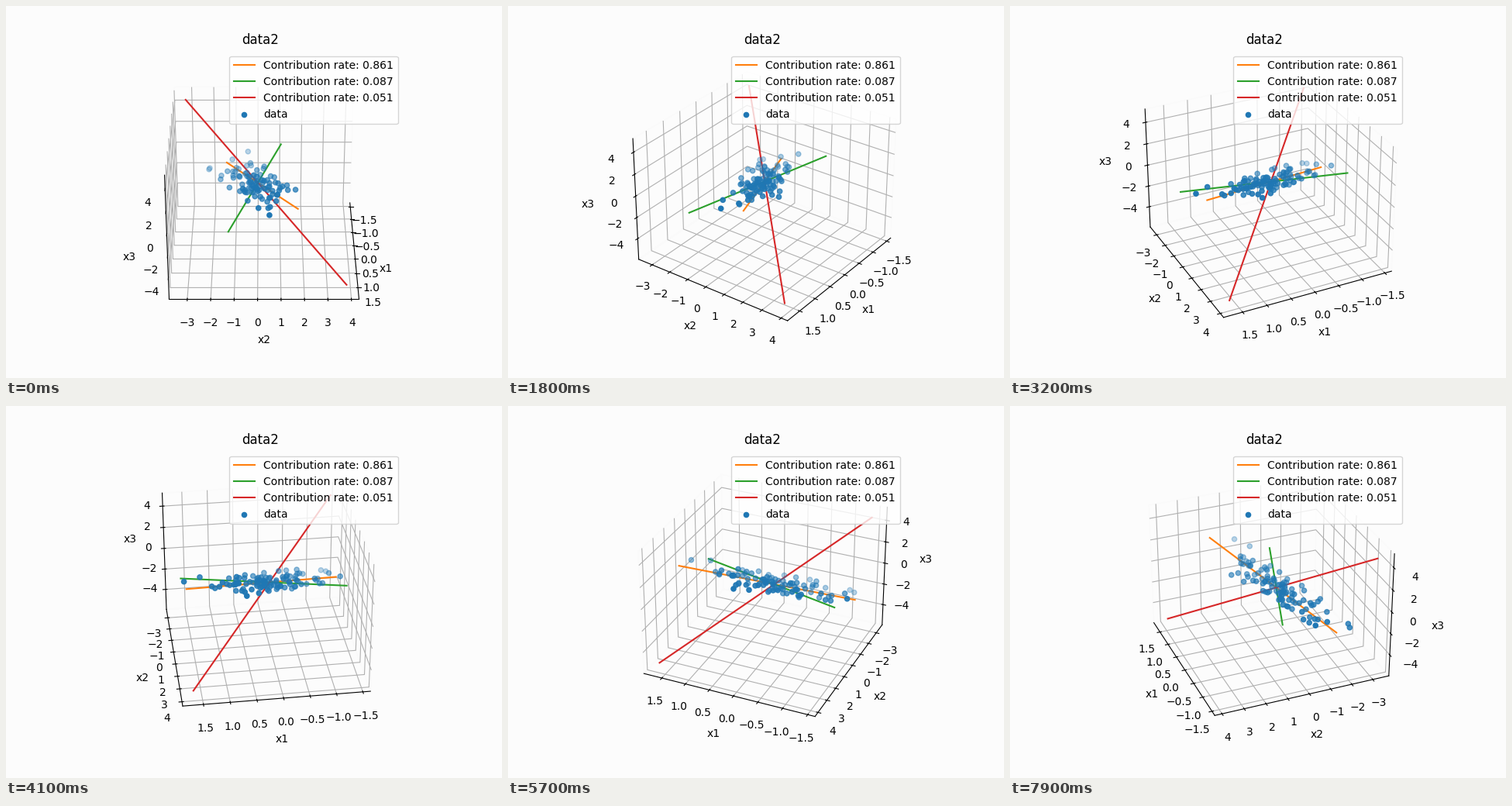
These frames come from a looping animation (640x480 px, 8 s). A matplotlib script:

```python
import numpy as np
import matplotlib.pyplot as plt
from matplotlib.animation import FuncAnimation

FRAMES, INTERVAL, STEP = 80, 100, 2
PAPER = "#fcfcfc"

CENTER = np.array([0.12, 0.276, -0.388])
HALF = np.array([1.765, 4.05, 5.605])

# slope of x2 and x3 against x1, colour, share of variance
AXES = [
    (1.015, 1.026, "C1", 0.861),
    (-0.739, -0.216, "C2", 0.087),
    (2.294, -3.176, "C3", 0.051),
]

# extreme samples at both ends of the cloud
ENDS = [(1.66, 0.50, 1.14), (1.34, 0.04, 0.97), (-1.42, -0.46, -0.39)]


def make_samples(total=100):
    """Scatter samples along the first axis, wide in x2 and thin in x3."""
    rng = np.random.default_rng(7)
    n = total - len(ENDS)
    my, mz = AXES[0][:2]
    x1 = rng.triangular(-1.4, 0.15, 1.25, n)
    side = rng.normal(0, 0.6, n).clip(-1.3, 1.1)
    lift = rng.normal(0, 0.32, n).clip(-0.7, 0.7)
    return np.vstack([ENDS, np.column_stack(
        [x1, my * x1 + side, mz * x1 + 0.45 * side + lift])])


fig = plt.figure(figsize=(6.4, 4.8), dpi=100, facecolor=PAPER)
ax = fig.add_subplot(projection="3d", facecolor=PAPER)

x = CENTER[0] + np.array([-1.0, 1.0]) * HALF[0] / 1.1458
for my, mz, color, rate in AXES:
    ax.plot(x, my * x, mz * x, color=color,
            label=f"Contribution rate: {rate:.3f}")
ax.scatter(*make_samples().T, color="C0", label="data")

low, high = CENTER - HALF, CENTER + HALF
ax.set_xlim(low[0], high[0])
ax.set_ylim(low[1], high[1])
ax.set_zlim(low[2], high[2])
ax.set_xticks(np.arange(-1.5, 1.6, 0.5))
ax.set_yticks(range(-3, 5))
ax.set_zticks(range(-4, 5, 2))
ax.set(xlabel="x1", ylabel="x2", zlabel="x3", title="data2")
for axis in (ax.xaxis, ax.yaxis, ax.zaxis):
    axis.pane.set(fill=False, edgecolor="#fafafa", alpha=1)
ax.legend(loc="upper right")


def update(i):
    ax.view_init(elev=30, azim=STEP * i)
    return []


anim = FuncAnimation(fig, update, frames=FRAMES, interval=INTERVAL,
                     init_func=lambda: update(0), repeat=True,
                     repeat_delay=0, blit=False)
plt.show()
```
